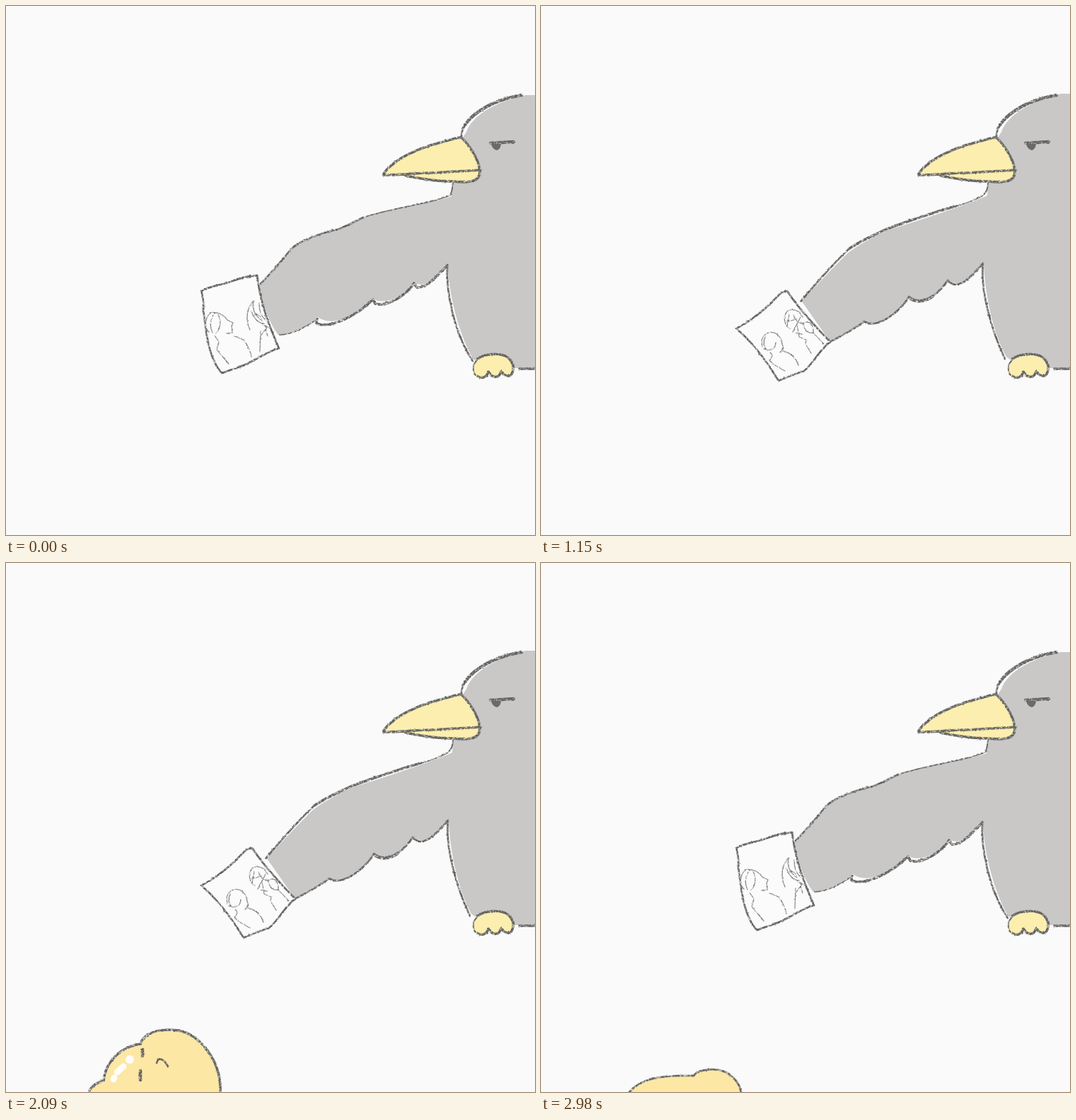
An HTML page that plays this animation: 748 px wide and 748 px high, repeating every 3 s.

```html
<!DOCTYPE html>
<html lang="en">
<head>
<meta charset="utf-8">
<title>Bird with a picture card</title>
<style>
  html, body { margin: 0; width: 100%; height: 100%; overflow: hidden; background: #fafafa; }
  svg { display: block; width: 100vw; height: 100vh; }

  .line { fill: none; stroke: #626262; stroke-width: 2.8; stroke-linecap: round; stroke-linejoin: round; filter: url(#pencil); }
  .thick { stroke-width: 4.6; }
  .mid { stroke-width: 3.6; }
  .thin { stroke-width: 1.9; }
  .doodle { stroke: #808080; stroke-width: 1.3; }
  .plumage { fill: #c9c8c7; }
  .beak { fill: #fceeaf; }
  .chick { fill: #fde7a5; }
  .paper { fill: #fbfbfb; }

  .pose { animation: 3s step-end infinite; }
  .raised { animation-name: raised; }
  .lowered { animation-name: lowered; }
  .peek { animation-name: peek; }
  .rise { animation-name: rise; }
  .tall { animation-name: tall; }

  @keyframes raised {
    0%, 14%, 29.6667%, 45.3333%, 61%, 76.6667%, 99.3333% { opacity: 1; }
    7%, 22.6667%, 38.3333%, 54%, 69.6667%, 85.3333% { opacity: 0; }
    100% { opacity: 1; }
  }
  @keyframes lowered {
    0%, 14%, 29.6667%, 45.3333%, 61%, 76.6667%, 99.3333% { opacity: 0; }
    7%, 22.6667%, 38.3333%, 54%, 69.6667%, 85.3333% { opacity: 1; }
    100% { opacity: 0; }
  }
  @keyframes peek {
    0%, 54%, 69.6667%, 85.3333%, 100% { opacity: 0; }
    45.3333%, 61%, 76.6667%, 99.3333% { opacity: 1; }
  }
  @keyframes rise {
    0%, 61%, 99.3333%, 100% { opacity: 0; }
    54%, 85.3333% { opacity: 1; }
  }
  @keyframes tall {
    0%, 76.6667%, 100% { opacity: 0; }
    69.6667% { opacity: 1; }
  }
</style>
</head>
<body>
<svg viewBox="0 0 748 748">
  <defs>
    <filter id="pencil" filterUnits="userSpaceOnUse" x="0" y="0" width="748" height="748" color-interpolation-filters="sRGB">
      <feTurbulence type="fractalNoise" baseFrequency="0.3" numOctaves="2" seed="4" result="noise"/>
      <feDisplacementMap in="SourceGraphic" in2="noise" scale="2.4" xChannelSelector="R" yChannelSelector="G" result="rough"/>
      <feColorMatrix in="noise" type="matrix" values="0 0 0 0 0  0 0 0 0 0  0 0 0 0 0  0 0 2.2 0 -0.25" result="grain"/>
      <feComposite in="rough" in2="grain" operator="in"/>
    </filter>
  </defs>

  <!-- wing raised -->
  <g class="pose raised">
    <path class="plumage" d="M748 126H735C700 133 660 152 651 178L646 186 668 225 632 250 630 269C605 279 560 282 505 300C490 307 480 313 468 316
      C450 320 436 326 425 331C412 337 406 341 403 346C390 361 375 378 359 396C362 420 372 448 385 465C400 465 430 452 441 440C462 455 495 438 519 414
      C535 424 560 412 578 391C592 400 606 386 625 364C625 400 638 460 661 500L680 512H748Z"/>
    <g class="line">
      <path class="thin" d="M632 250Q631 260 629 267C605 279 560 282 505 299"/>
      <path d="M505 299C490 306 480 312 468 316C450 320 436 325 425 330C412 336 406 340 402 345M402 345C390 360 375 377 358 395"/>
      <path class="thin" d="M387 465C405 465 428 452 441 442"/>
      <path class="mid" d="M440 443L439 449C460 457 498 436 519 415L522 421C542 426 568 406 577 392L581 398C594 399 604 387 624 367"/>
      <path d="M624 366C622 400 632 460 660 502"/>
    </g>
    <path class="paper" d="M276 404Q310 387 355 381C357 415 370 460 386 484Q345 505 306 519C285 495 280 440 276 404Z"/>
    <g class="line">
      <path d="M276 403C291 395 304 395 317 390Q337 382 355 381L358 400C363 428 373 455 386 484C371 488 361 496 350 501C335 511 320 513 306 519C299 514 295 504 291 494C283 473 283 455 279 431Q280 416 276 403"/>
      <path class="doodle" d="M289 434C281 441 280 455 287 461M293 437Q286 450 292 462M300 436Q307 451 297 463
        M288 434Q304 431 313 444L321 448 319 453 320 462 312 463M295 466L301 475 298 486 315 506M323 467L336 472Q345 484 347 496
        M350 417C342 425 337 441 345 458M350 417Q346 433 362 445M358 420Q358 436 366 443M347 431Q352 448 365 449
        M351 437Q357 435 360 440M362 449L369 455 361 465M365 451L374 456M360 460L359 489M367 457L370 467"/>
    </g>
  </g>

  <!-- wing lowered -->
  <g class="pose lowered">
    <path class="plumage" d="M748 124H735C700 132 660 152 651 178L646 186 668 225 632 250 631 268C608 279 545 300 491 317
      C465 328 443 342 433 350C417 366 387 397 369 418L409 475C430 464 446 456 457 444C473 457 503 436 520 411
      C537 425 558 413 575 387C592 400 607 387 626 363C627 400 637 458 658 496L680 512H748Z"/>
    <g class="line">
      <path class="thin" d="M632 250Q632 262 625 268Q610 277 580 285"/>
      <path class="mid" d="M586 283C552 293 514 306 490 315C465 326 445 337 436 343"/>
      <path d="M436 343C416 362 388 393 368 417"/>
      <path d="M409 475C429 464 445 456 457 446C474 457 504 436 520 412"/>
      <path class="thick" d="M520 412C531 421 545 417 553 411"/>
      <path d="M553 411Q567 401 575 388M575 388C587 402 603 390 625 364M625 364C621 400 636 457 656 499"/>
    </g>
    <path class="paper" d="M276 456Q310 438 347 403L409 475Q386 521 336 530Q312 484 276 456Z"/>
    <g class="line">
      <path d="M276 456C300 444 325 421 340 405L348 403C359 420 385 451 409 475C395 484 385 506 372 516C360 520 348 524 336 530C322 507 301 477 276 456Z"/>
      <path class="doodle" d="M313 482C308 465 323 458 332 463Q340 468 341 478L343 484 338 490M315 485Q331 490 332 476M317 467Q313 477 318 486
        M324 490Q330 494 323 501L329 507 345 516M342 488Q358 491 364 508
        M348 432C341 441 345 453 352 456M349 431Q363 426 370 440M351 436L348 452M357 437Q362 451 372 448M347 447L360 443
        M370 450C378 442 386 450 385 462Q374 464 371 451M362 450L365 468 375 472 374 478 382 491M385 462L400 478M367 440L356 461M360 462L369 464"/>
    </g>
  </g>

  <!-- head and foot -->
  <path class="beak" d="M534 238C546 220 570 207 600 197L643 186C655 197 668 215 670 233C670 247 652 250 632 249C605 248 580 244 565 240Z"/>
  <path class="beak" d="M662 522C657 506 668 492 690 492C711 491 719 505 717 516C715 526 707 525 700 518C696 528 687 526 682 518C678 527 668 527 662 522Z"/>
  <g class="line">
    <path d="M644 184Q644 176 649 169"/>
    <path class="thick" d="M649 168C662 149 692 132 729 126"/>
    <path class="mid" d="M534 237C546 220 570 207 600 197L643 185C655 197 667 214 670 232M534 239C560 239 580 236 600 236L671 232M565 240C585 244 610 248 632 248C652 250 671 250 670 233"/>
    <path class="thick" d="M685 194L718 192"/>
    <path class="mid" d="M667 499C674 493 688 491 700 493C712 495 719 506 717 515C715 526 706 525 700 517C697 527 688 527 682 517C680 525 674 527 667 524"/>
    <path class="thin" d="M664 522C659 515 660 507 665 502"/>
    <path class="mid" d="M726 513H748"/>
  </g>
  <path fill="#6a6a6a" d="M686 195H700Q699 203 694 204Q688 203 686 195Z"/>

  <!-- chick -->
  <g class="pose peek">
    <path class="chick" d="M126 748C140 731 165 725 217 725C223 715 250 713 265 722Q279 731 282 748Z"/>
    <path class="line" d="M125 748C140 730 165 724 216 725C222 715 250 713 265 722Q280 732 283 748"/>
  </g>
  <g class="pose rise">
    <path class="chick" d="M131 748C133 727 155 712 211 710C213 697 235 691 255 697C275 706 282 728 291 748Z"/>
    <g class="line">
      <path d="M130 748C132 726 155 712 211 709C212 697 235 690 255 697C275 706 282 728 292 748"/>
      <path class="thick" d="M191 728L192 738"/>
      <path class="mid" d="M211 740Q217 736 222 741"/>
    </g>
  </g>
  <g class="pose tall">
    <path class="chick" d="M118 748C122 739 131 735 139 733C141 710 159 686 191 681C196 666 216 658 245 662C275 669 304 706 303 748Z"/>
    <circle cx="175" cy="702" r="6" fill="#fffdf8"/>
    <path d="M152 730L153 728M157 720L166 712" fill="none" stroke="#fffdf8" stroke-width="9" stroke-linecap="round"/>
    <g class="line">
      <path class="mid" d="M118 746C122 738 131 734 138 732C140 709 158 685 190 680C195 665 215 657 245 661C275 668 305 705 303 748"/>
      <path class="thick" d="M193 688V697M190 718V731"/>
      <path d="M213 707C215 697 224 702 229 712"/>
    </g>
  </g>
</svg>
</body>
</html>
```
